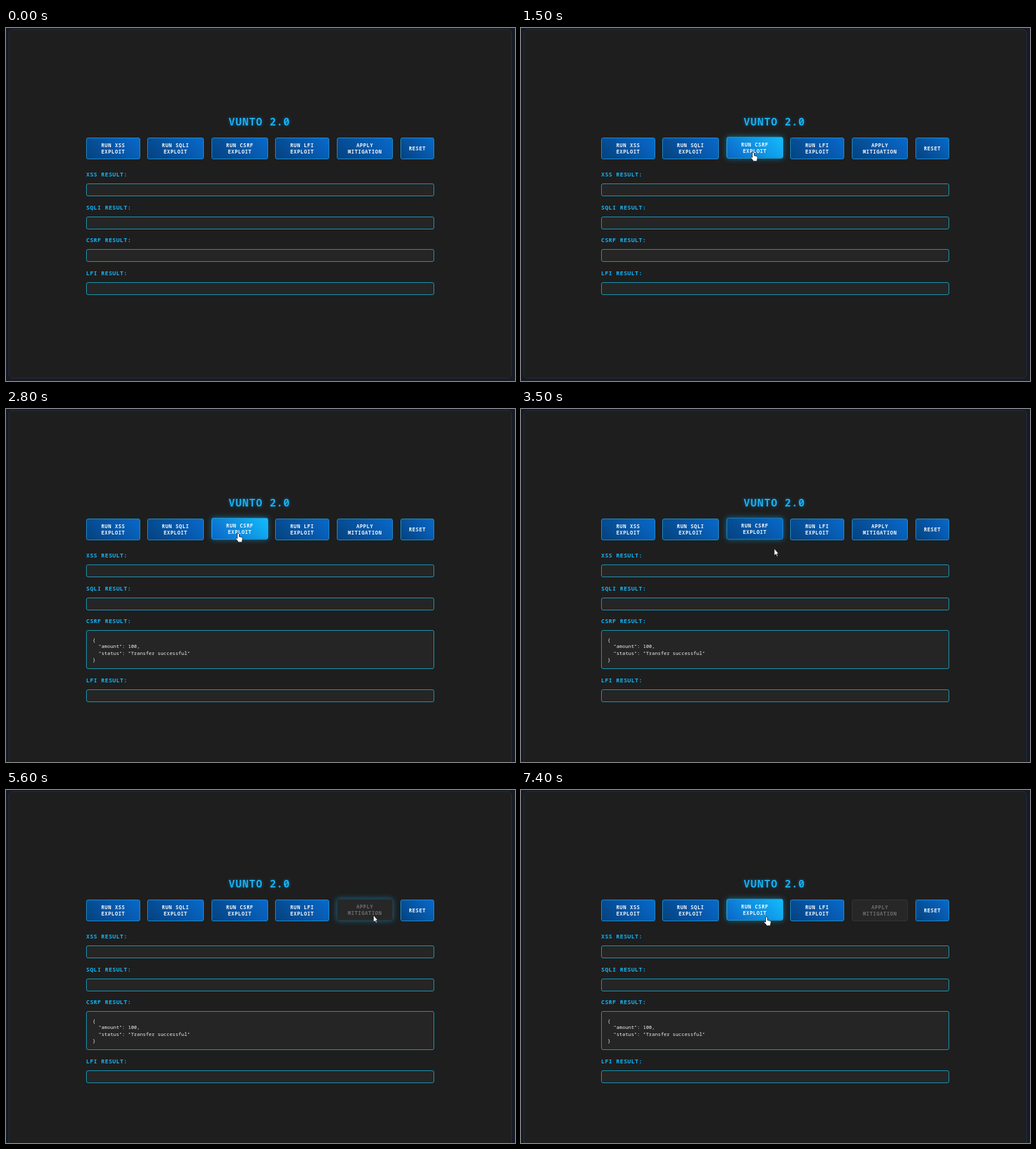
Write an HTML page that moves like this. It is 800 px wide and 554 px high and loops after 8000 ms.

```html
<!DOCTYPE html>
<html lang="en">
<head>
<meta charset="utf-8">
<title>Exploit demo</title>
<style>
html, body { margin: 0; width: 100%; height: 100%; overflow: hidden; background: #171b25; }
#stage { position: relative; width: 800px; height: 554px; overflow: hidden;
  font-family: "Noto Sans Mono", "DejaVu Sans Mono", monospace; }
#stage > * { position: absolute; box-sizing: border-box; white-space: pre; }
#panel { left: 4px; top: 2px; width: 791px; background: #1e1e1e;
  border: 1px solid #222c40; border-radius: 6px; }
#title { left: 350px; top: 136px; line-height: 22px; font-size: 16px; font-weight: 800;
  letter-spacing: 1.15px; color: #18b2f4; text-shadow: 0 0 5px rgba(0, 150, 230, .55); }
.btn { top: 172px; height: 34px; display: flex; align-items: center; justify-content: center;
  text-align: center; font-size: 8px; line-height: 10.3px; font-weight: 600;
  letter-spacing: .55px; color: #f2f6fa; border: 1px solid #1f8fcb; border-radius: 3px;
  background: linear-gradient(45deg, #04427f, #0869cb); }
.btn.hover { background: linear-gradient(45deg, #0a66c8, #13bbfc); border-color: #22b4ee; }
.btn.off { background: #272727; border-color: #343434; color: #6c6c6c; }
.label { left: 126px; line-height: 14px; font-size: 9px; font-weight: 800;
  letter-spacing: .5px; color: #14b3f6; }
.result { left: 126px; width: 547px; height: 20px; padding: 9px 9px 0; overflow: hidden;
  background: #252525; border: 1px solid #1c9bba; border-radius: 3px;
  color: #ededed; font-size: 7.75px; line-height: 10.4px; }
#cursor { left: 0; top: 0; width: 24px; height: 24px; overflow: visible; }
#cursor path { fill: #fff; stroke: #15181c; stroke-width: .8; stroke-linejoin: round; }
</style>
</head>
<body>
<div id="stage">
  <div id="panel"></div>
  <div id="title">VUNTO 2.0</div>
</div>
<script>
const LOOP = 8000, STEP = 100;
const RESULT_AT = 2800, DISABLED_AT = 5600, GROWTH = 41;
const REPLY = '{\n  "amount": 100,\n  "status": "Transfer successful"\n}';
const ARROW = 'M0 0V11L2.5 8.8L4.2 12.3L5.8 11.6L4.2 8.2L7 8Z';
const HAND = 'M-1.5 1Q0 -1 1.5 1V5.3L5.4 6.2Q7 6.7 7 8.5L6 12V14H-.5V12.5L-4 8.7Q-4 6.5 -1.5 8.2Z';

// time, x, y of the pointer tip
const PATH = [
  [100, 432, 562], [500, 418, 440], [900, 392, 285], [1200, 367, 204], [1500, 365, 195],
  [3200, 365, 195], [3400, 383, 204], [3500, 398, 219], [3600, 403, 222], [3700, 408, 223],
  [4000, 498, 224], [4200, 553, 204], [4500, 577.5, 196.5], [5800, 577.5, 196.5],
  [6000, 490, 215], [6300, 342, 227], [6500, 342, 227], [6600, 340, 226],
  [6900, 352, 222], [7100, 371, 205], [7400, 386, 199]
];
const HOVERS = { csrf: [[1200, 3500], [7100, 9000]], apply: [[4200, DISABLED_AT]] };
const PRESSES = [[2000, 2200], [5000, 5200]];

const stage = document.getElementById('stage');
const panel = document.getElementById('panel');

function add(className, text, style) {
  const el = document.createElement('div');
  el.className = className;
  el.textContent = text;
  Object.assign(el.style, style);
  return stage.appendChild(el);
}

const buttons = {};
[['xss', 126, 85, 'RUN XSS\nEXPLOIT'], ['sqli', 222, 89, 'RUN SQLI\nEXPLOIT'],
 ['csrf', 323, 89, 'RUN CSRF\nEXPLOIT'], ['lfi', 423, 85, 'RUN LFI\nEXPLOIT'],
 ['apply', 520, 88, 'APPLY\nMITIGATION'], ['reset', 620, 53, 'RESET']
].forEach(([id, x, w, text]) => {
  buttons[id] = add('btn', text, { left: x + 'px', width: w + 'px' });
});

const rows = [['XSS', 244], ['SQLI', 296], ['CSRF', 347], ['LFI', 399]].map(([name, y]) => ({
  label: add('label', name + ' RESULT:', { top: y - 21 + 'px' }),
  box: add('result', '', { top: y + 'px' })
}));

const NS = 'http://www.w3.org/2000/svg';
const cursor = document.createElementNS(NS, 'svg');
cursor.id = 'cursor';
const shape = cursor.appendChild(document.createElementNS(NS, 'path'));
stage.appendChild(cursor);

const clamp = v => Math.max(0, Math.min(1, v));
const within = (t, spans) => spans.some(([a, b]) => t >= a && t < b);

function pointAt(t) {
  const i = PATH.findIndex(p => p[0] > t);
  if (i === 0) return PATH[0].slice(1);
  if (i < 0) return PATH[PATH.length - 1].slice(1);
  const [a, b] = [PATH[i - 1], PATH[i]];
  const k = (t - a[0]) / (b[0] - a[0]);
  return [1, 2].map(n => a[n] + (b[n] - a[n]) * k);
}

// Rises over 200 ms, falls over 100 ms
const liftAt = (t, spans) => Math.max(...spans.map(([a, b]) =>
  t < b ? clamp((t - a) / 200) : clamp(1 - (t - b) / 100)));

function render(t) {
  const open = t >= RESULT_AT;
  panel.style.height = (open ? 600 : 548) + 'px';
  const [, , csrf, lfi] = rows;
  csrf.box.textContent = open ? REPLY : '';
  csrf.box.style.height = (open ? 20 + GROWTH : 20) + 'px';
  const shift = `translateY(${open ? GROWTH : 0}px)`;
  lfi.label.style.transform = lfi.box.style.transform = shift;

  let hand = false;
  for (const id in HOVERS) {
    const el = buttons[id], hover = within(t, HOVERS[id]);
    const glow = liftAt(t, HOVERS[id]);
    const lift = within(t, PRESSES) ? 0 : glow;
    hand = hand || hover;
    el.classList.toggle('hover', hover);
    el.style.transform = `translateY(${-1.2 * lift}px)`;
    el.style.boxShadow = glow ? `0 0 8px rgba(0, 180, 255, ${0.55 * glow})` : 'none';
  }
  buttons.apply.classList.toggle('off', t >= DISABLED_AT);

  const [x, y] = pointAt(t);
  shape.setAttribute('d', hand ? HAND : ARROW);
  cursor.style.transform = `translate(${x}px, ${y}px)`;
}

const start = performance.now();
function tick() {
  const t = (performance.now() - start) % LOOP;
  render(Math.floor(t / STEP) * STEP);
  requestAnimationFrame(tick);
}
tick();
</script>
</body>
</html>
```
